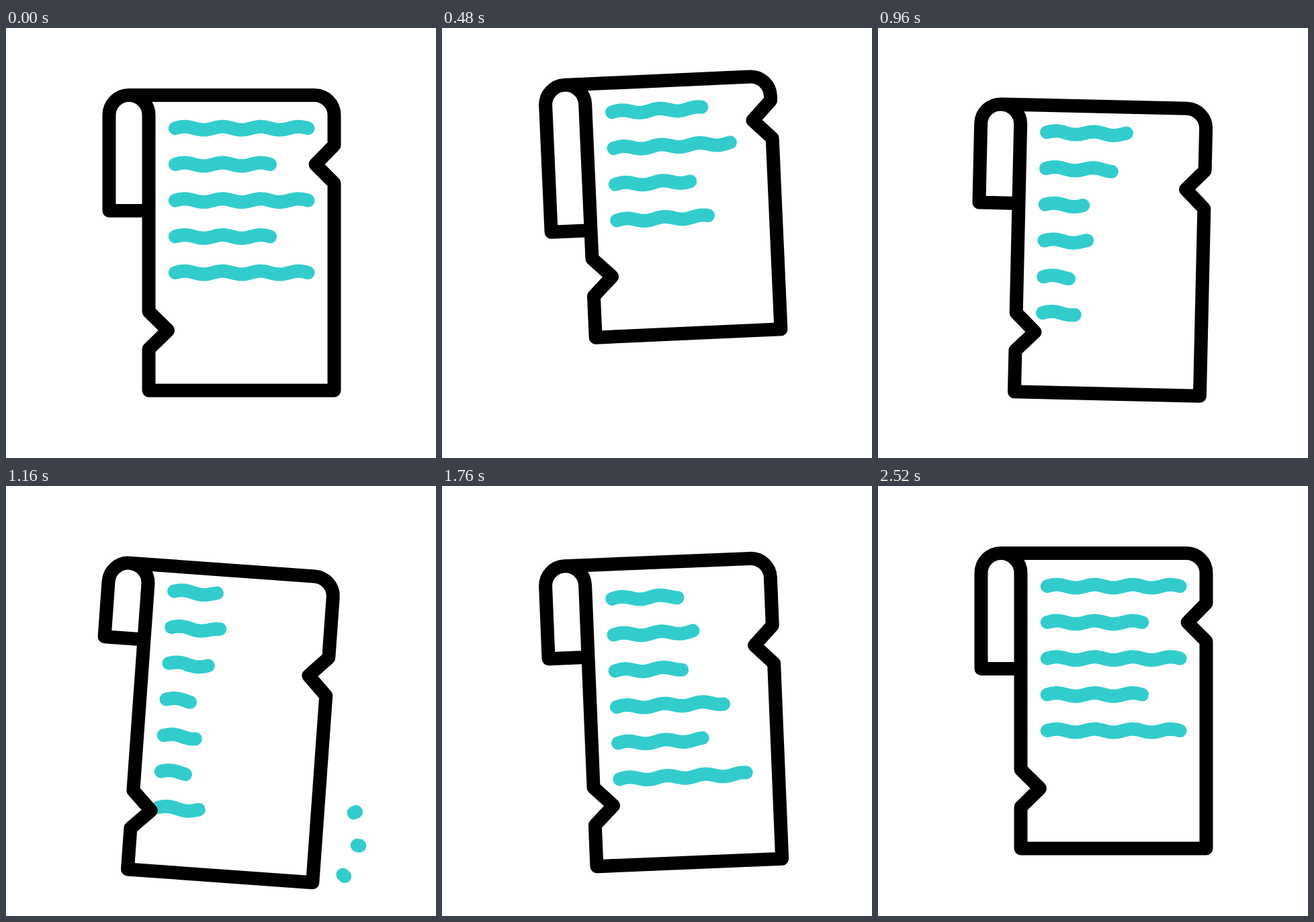
Recreate the animation shown at these times as an HTML page. Size 640 px wide and 640 px high, loop 3000 ms.

```html
<!DOCTYPE html>
<html lang="en">
<head>
<meta charset="utf-8">
<title>Scroll</title>
<style>
html, body { margin: 0; width: 100%; height: 100%; overflow: hidden; background: #fff; }
svg { display: block; width: 100vw; height: 100vh; }
path { fill: none; stroke-width: 20; stroke-linecap: round; stroke-linejoin: round; }
.ink { stroke: #3cc; }
.edge { stroke: #000; }
</style>
</head>
<body>
<svg viewBox="0 0 640 640">
  <defs><clipPath id="below"><rect x="150" y="100" width="400" height="500"/></clipPath></defs>
  <path id="sparks" class="ink"/>
  <g id="paper">
    <g clip-path="url(#below)"><path id="text" class="ink"/></g>
    <path id="edge" class="edge"/>
  </g>
</svg>
<script>
const LOOP = 3000, STEP = 40, START = 75;
const $ = id => document.getElementById(id);
const clamp = x => Math.max(0, Math.min(1, x));
const ease = x => (1 - Math.cos(Math.PI * clamp(x))) / 2;
const mix = (a, b, k) => a + (b - a) * k;
const n = x => x.toFixed(2);

// One eased move: 0 before t0, 1 after t1
const move = (t, t0, t1) => ease((t - t0) / (t1 - t0));

// The paper swings left, right, left, right and settles
function tilt(t) {
  return -3.4 * move(t, START, 680) + 7.5 * move(t, 680, 1160) - 7.5 * move(t, 1160, 1615)
    + 4.3 * move(t, 1615, 2060) - .9 * move(t, 2060, 2380);
}

// It hops up, drops below its place, then returns
function lift(t) {
  return -16.2 * move(t, START, 560) + 30.2 * move(t, 560, 1000)
    + 5.3 * move(t, 1000, 1700) - 19.3 * move(t, 1950, 2380);
}

// Every part of the paper rolls up, then down, then returns
function roll(up, down, t) {
  const rolled = mix(up * move(t, START, 638), down, move(t, 638, 1149));
  return rolled * (1 - move(t, 1540, 2035));
}

function edgePath(t) {
  const low = roll(-75.8, 15.3, t);
  const flap = roll(56, -60, t);
  const notch = roll(-46.4, 45, t);
  const r = 'A29.5 29.5 0 0 ';
  return `M183 100H459${r}1 488.5 129.5V${n(174.5 + notch)}l-28 28.5 28 28` +
    `V${n(539.5 + low)}H212.5V${n(478 + low)}l28.5-28-28.5-28` +
    `V129.5${r}0 183 100${r}0 153.5 129.5V${n(272 + flap)}H212.5`;
}

const WAVE = 56.5;

function wave(y, len) {
  let d = '';
  for (let x = 0; ; x += 3) {
    const u = Math.min(x, len);
    d += (x ? 'L' : 'M') + n(251.8 + u) + ' ' + n(y - 2.4 * Math.sin(u * 2 * Math.PI / WAVE));
    if (x >= len) return d;
  }
}

// Rows shrink and regrow in turn, from the lowest upwards; two more wait above
function textPath(t) {
  const shift = roll(-72.5, 95.4, t);
  let d = '';
  for (let row = -2; row < 5; row++) {
    const short = (Math.abs(row + .5) - .5) % 2;
    const mid = 990 + 82.5 * (4 - row);
    const k = mix(.24, 1, ease(Math.abs(t - mid) / 915));
    d += wave(149.2 + 53.75 * row + shift, (3.5 - short) * WAVE * k);
  }
  return d;
}

// Three rays of a fan; side -1 is the same fan turned half round the middle
function fan(t, start, delay, side) {
  const ray = time => mix(88, 110, clamp((t - time) / 212));
  const head = ray(start), tail = ray(start + delay);
  if (head <= tail) return '';
  let d = '';
  for (let i = -1; i < 2; i++) {
    const a = (10 + 32 * i) * Math.PI / 180;
    const at = r => n(311.8 + side * (124.2 + r * Math.cos(a))) + ' ' +
      n(343.2 + side * (176.3 + r * Math.sin(a)));
    d += `M${at(tail)}L${at(head)}`;
  }
  return d;
}

function draw(t) {
  $('paper').setAttribute('transform',
    `translate(0 ${n(lift(t))}) rotate(${tilt(t).toFixed(3)} 183 115)`);
  $('edge').setAttribute('d', edgePath(t));
  $('text').setAttribute('d', textPath(t));
  $('sparks').setAttribute('d', fan(t, 1124, 171, 1) + fan(t, 1193, 192, -1));
}

function tick() {
  const t = performance.now() % LOOP;
  draw(Math.floor(t / STEP) * STEP);
  requestAnimationFrame(tick);
}
tick();
</script>
</body>
</html>
```
